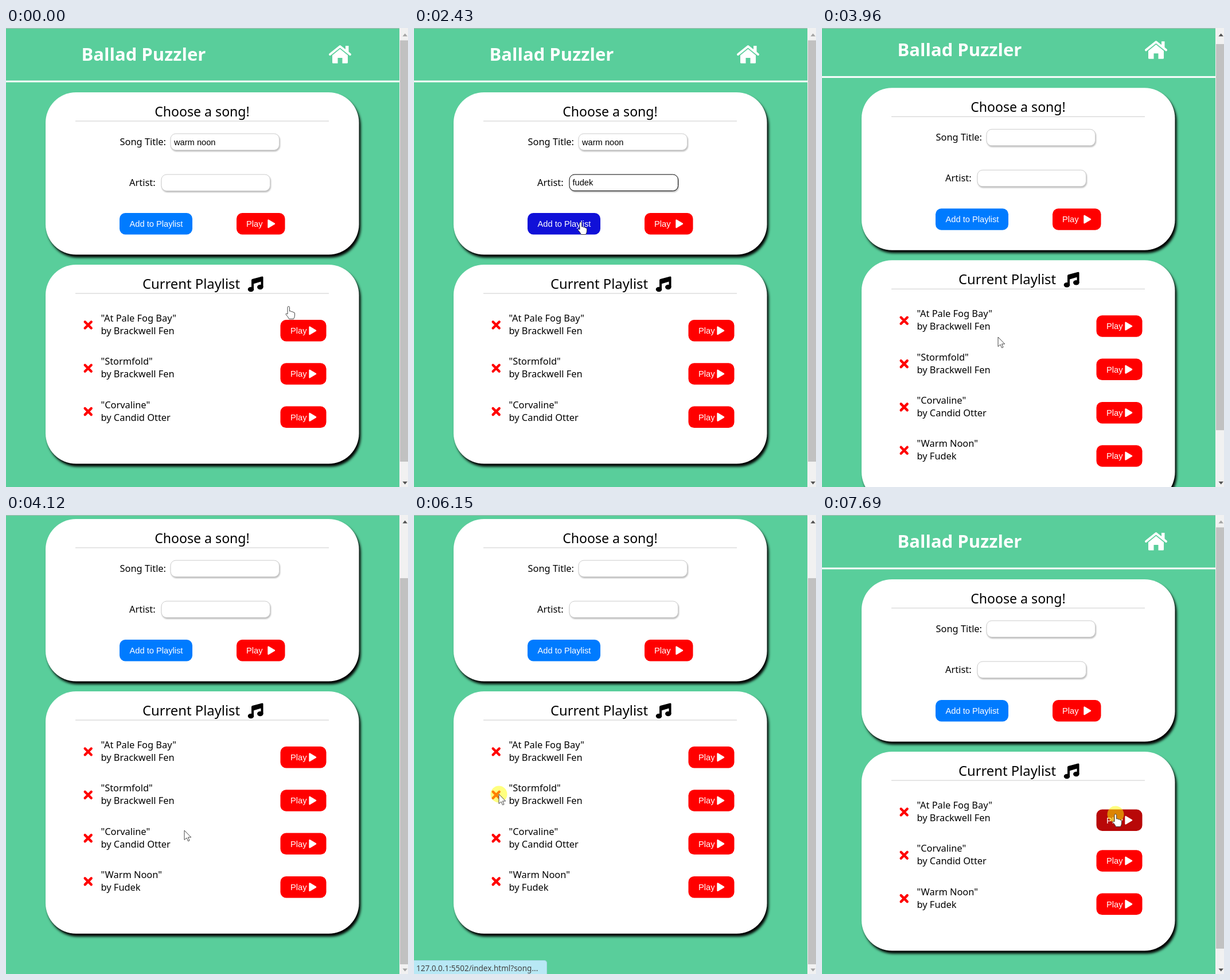
Animation of 701 by 799 pixels, one loop 8000 ms. Source, as an HTML page:

```html
<!DOCTYPE html>
<html lang="en">
<head>
<meta charset="utf-8">
<title>Ballad Puzzler</title>
<style>
  html, body { margin: 0; height: 100%; overflow: hidden; background: #59ce9b; }
  svg { display: block; width: 100vw; height: 100vh; }
  text { font: 500 16.4px "Noto Sans", "Open Sans", sans-serif; white-space: pre; }
  .title { font-size: 31px; font-weight: 700; fill: #fff; }
  .head { font-size: 23.8px; text-anchor: middle; }
  .ui { font: 14.67px "Liberation Sans", Arial, sans-serif; }
  .btn text, .tri { fill: #fff; }
  .tri { stroke: #fff; stroke-width: 2.4; stroke-linejoin: round; }
  .card { fill: #fff; filter: drop-shadow(3px 5px 2.2px #000); }
  .field { fill: #fff; stroke: #ccc; filter: drop-shadow(1px 2px 1px #bbb); }
  .menu { fill: #fff; filter: drop-shadow(0 1px 2px #0005); }
  .menu + g text { font-size: 15.2px; fill: #1a1a1a; }
  .cross { stroke: red; stroke-width: 4.4; stroke-linecap: round; }
  .cursor { fill: #fff; stroke: #333; stroke-width: .9; stroke-linejoin: round; }
</style>
</head>
<body>
<svg id="stage" viewBox="0 0 701 799">
  <g id="page">
    <rect y="91.500" width="686" height="3" fill="#fff"/>
    <text class="title" x="131.500" y="57">Ballad Puzzler</text>
    <g fill="#fff">
      <path d="M565 46L582.5 32 600 46" fill="none" stroke="#fff" stroke-width="4" stroke-linecap="round" stroke-linejoin="round"/>
      <path d="M592 31h5.5v12l-5.5-5zM569 47.500l13.500-11 13.500 11V60q0 1.500-1.500 1.500H586.500V52h-8v9.500H570.500q-1.500 0-1.500-1.500z"/>
    </g>

    <rect class="card" x="69" y="112" width="546.500" height="282.500" rx="53"/>
    <text class="head" x="342" y="154" style="font-size:23.100px">Choose a song!</text>
    <rect x="121" y="161.500" width="442" height="1" fill="#ccc"/>
    <text x="198.500" y="204">Song Title:</text>
    <rect class="field" x="287" y="184" width="189.500" height="28.500" rx="9"/>
    <text class="ui" id="song" x="293" y="203.500"></text>
    <text x="215" y="275">Artist:</text>
    <rect class="field" id="artistBox" x="271" y="255" width="189.500" height="28.500" rx="9"/>
    <text class="ui" id="artist" x="276.500" y="274"></text>
    <rect id="caret" y="262" width="1" height="15"/>
    <g class="btn" id="add">
      <rect x="198" y="322" width="127" height="37.500" rx="10"/>
      <text class="ui" x="215.500" y="346">Add to Playlist</text>
    </g>
    <g class="btn">
      <rect x="402" y="322" width="84.500" height="37.500" rx="10" fill="red"/>
      <text class="ui" x="419" y="346">Play</text>
      <path class="tri" d="M457.500 334.500v12.500l10.500-6.250z"/>
    </g>

    <rect class="card" id="listCard" x="69" y="412" width="546.500" rx="53"/>
    <text class="head" x="323" y="454">Current Playlist</text>
    <rect x="121" y="461.500" width="442" height="1" fill="#ccc"/>
    <path d="M428 439q0-1.500 1.500-2l17-4.500q2-.5 2 1.500V451h-4V441.500l-12.500 3.800V455h-4z"/>
    <ellipse cx="427" cy="455" rx="5.300" ry="4.200"/>
    <ellipse cx="443.300" cy="451" rx="5.300" ry="4.200"/>
    <g id="rows"></g>

    <g id="menu">
      <rect class="menu" x="269.500" y="284" width="235" rx="4"/>
      <g></g>
    </g>
  </g>

  <rect width="686" height="1" fill="#b4b8b6"/>
  <rect x="686" width="15" height="799" fill="#f1f1f1"/>
  <rect id="thumb" x="687" width="14" fill="#c1c1c1"/>
  <path id="up" d="M691.500 14.500h8.500l-4.250-5z"/>
  <path id="down" d="M691.500 789.500h8.500l-4.250 5z"/>
  <g id="status">
    <path d="M-1 775.500H227q4.500 0 4.500 4.500V800H-1z" fill="#b8e8f5" stroke="#a5d5e2"/>
    <text x="4" y="794" fill="#444" style="font-size:13.500px;font-weight:400">127.0.0.1:5502/index.html?song...</text>
  </g>
  <circle id="press" r="14.500" fill="#ff0" opacity=".5"/>
  <g id="pointer">
    <path id="arrow" class="cursor" d="M0 0V16.500L4 13 6.500 18.700 9 17.700 6.500 12H11.700Z"/>
    <path id="hand" class="cursor" d="M-2 1.500Q-2-.3-.3-.3 1.500-.3 1.500 1.500V8Q4 7 5 9 7 8 8 10 10.500 9.500 10.500 12V15Q10.500 18 8.500 21.500H.5Q-1 18-5 13.500-5.500 11-2 13Z"/>
    <path id="beam" d="M-4-8H-1Q0-8 0-7V7Q0 8-1 8H-4M4-8H1Q0-8 0-7M4 8H1Q0 8 0 7" fill="none" stroke="#000" stroke-width="1.500"/>
  </g>
</svg>
<script>
const LOOP = 8000, PITCH = 75.3, VIEW = 798, TRACK = 760;
const SUBMIT = 3090, REMOVE = 6220;
const $ = id => document.getElementById(id);
const show = (id, on) => $(id).style.display = on ? '' : 'none';
const set = (el, attrs) => { for (const k in attrs) el.setAttribute(k, attrs[k]); };
const within = (v, a, b) => v >= a && v < b;

const songs = [
  ['At Pale Fog Bay', 'Brackwell Fen'],
  ['Stormfold', 'Brackwell Fen'],
  ['Corvaline', 'Candid Otter'],
  ['Warm Noon', 'Fudek'],
];
const hints = ['brackwell fen', '1', 'dorvam', 'halverin domas', '2', '4'];
const keyTimes = [1070, 1300, 1430, 1560, 1810];

// Pointer moves: start, end, steps, target x, y, optional control point
const moves = [
  [70, 500, 6, 381, 271, 400, 200],
  [2160, 2430, 5, 291, 338],
  [3490, 3960, 7, 307, 538],
  [4050, 4120, 2, 311, 549],
  [4780, 5550, 12, 160, 475],
  [5620, 6010, 6, 148, 486],
  [6480, 7220, 12, 478, 522],
  [7290, 7490, 4, 512, 521],
];
const presses = [[640, 850], [2690, 3040], [6150, REMOVE], [7690, LOOP]];

$('rows').innerHTML = songs.map(([name, by]) => `<g>
  <path class="cross" d="M137.700 511.500l11 11m0-11l-11 11"/>
  <text x="165.500" y="511">"${name}"</text>
  <text x="165.500" y="533">by ${by}</text>
  <g class="btn">
    <rect x="478.500" y="508" width="80" height="37.500" rx="10" fill="red"/>
    <text class="ui" x="496" y="532">Play</text>
    <path class="tri" d="M529.500 520.500v12.500l10.500-6.250z"/>
  </g></g>`).join('');
const rows = [...$('rows').children];

function pointerAt(t) {
  let x = 493, y = 485;
  for (const [start, end, n, tx, ty, cx = (x + tx) / 2, cy = (y + ty) / 2] of moves) {
    if (t < start) break;
    const step = Math.floor((t - start) / (end - start) * (n - 1) + 1e-6);
    const p = Math.min(1, (step + 1) / n), q = 1 - p;
    x = q * q * x + 2 * q * p * cx + p * p * tx;
    y = q * q * y + 2 * q * p * cy + p * p * ty;
  }
  return [x, y];
}

function scrollAt(t) {
  if (t < 3960 || t >= REMOVE) return 0;
  return t < 4050 ? 7.7 : t < 4120 ? 60 : 105;
}

let menuKey;
function drawMenu(items) {
  show('menu', items.length);
  const key = items.join();
  if (key === menuKey) return;
  menuKey = key;
  const [box, list] = $('menu').children;
  set(box, { height: 22 + 43.7 * items.length });
  list.innerHTML = items.map((s, i) => `<text x="284.500" y="${322 + 43.7 * i}">${s}</text>`).join('');
}

function draw(t) {
  const visible = t < SUBMIT ? [0, 1, 2] : t < REMOVE ? [0, 1, 2, 3] : [0, 2, 3];
  const scroll = scrollAt(t);
  const [x, y] = pointerAt(t);
  const py = y + scroll;
  const down = presses.some(([a, b]) => within(t, a, b));

  set($('page'), { transform: `translate(0 ${-scroll})` });
  rows.forEach((row, i) => {
    const place = visible.indexOf(i);
    row.style.display = place < 0 ? 'none' : '';
    set(row, { transform: `translate(0 ${place * PITCH})` });
  });
  set($('listCard'), { height: 346.5 + (visible.length - 3) * PITCH });

  // Form
  const filled = t < SUBMIT, focus = within(t, 640, 2690);
  const typed = filled ? keyTimes.filter(k => t >= k).length : 0;
  $('song').textContent = filled ? 'warm noon' : '';
  $('artist').textContent = 'fudek'.slice(0, typed);
  $('artistBox').style.stroke = focus ? '#000' : '';
  show('caret', within(t, 640, 2160));
  set($('caret'), { x: 277 + (typed ? $('artist').getComputedTextLength() : 0) });
  drawMenu(within(t, 710, 1140) ? hints : within(t, 1140, 1430) ? ['fudek'] : []);

  // Buttons
  const onAdd = within(x, 198, 325) && within(py, 322, 360);
  const onPlay = within(x, 478.5, 559) && within(py, 508, 546);
  const paint = (btn, hover, base, dark) => {
    set(btn, { transform: `translate(0 ${hover && down ? 4.5 : 0})` });
    set(btn.firstElementChild, { fill: hover ? dark : base });
  };
  paint($('add'), onAdd, '#007bff', '#1010d8');
  paint(rows[0].lastElementChild, onPlay, 'red', '#b80808');

  // Scrollbar
  const doc = 827 + (visible.length - 3) * PITCH, ratio = TRACK / doc;
  set($('thumb'), { y: 21.5 + scroll * ratio, height: VIEW * ratio });
  set($('up'), { fill: scroll ? '#505050' : '#a3a3a3' });
  set($('down'), { fill: scroll > 100 ? '#a3a3a3' : '#505050' });

  // Pointer
  show('status', within(t, 5700, 6550));
  show('press', down);
  set($('press'), { cx: x, cy: y });
  set($('pointer'), { transform: `translate(${x} ${y})` });
  const onField = filled && within(x, 271, 461) && within(py, 255, 284);
  const kind = onField ? 'beam' : t < 70 || onAdd || onPlay ? 'hand' : 'arrow';
  for (const k of ['arrow', 'hand', 'beam']) show(k, k === kind);
}

function frame(now) {
  draw(now % LOOP);
  requestAnimationFrame(frame);
}
draw(0);
requestAnimationFrame(frame);
</script>
</body>
</html>
```
